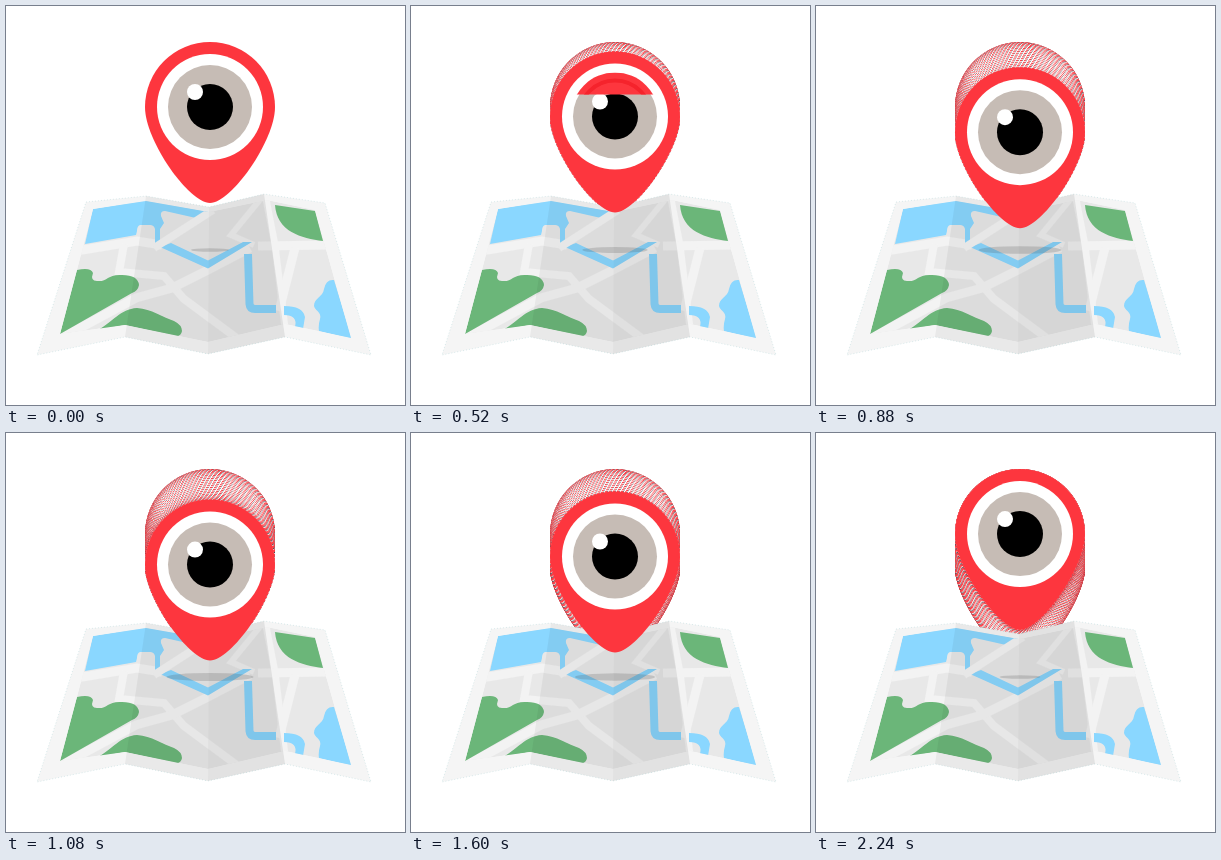
Write an HTML page with a canvas that moves like this. It is 399 px wide and 399 px high and loops after 2280 ms.

```html
<!DOCTYPE html>
<html lang="en">
<head>
<meta charset="utf-8">
<title>Map pin</title>
<style>
html, body { margin: 0; width: 100%; height: 100%; overflow: hidden; background: #fff; }
canvas { display: block; width: 399px; height: 399px; }
</style>
</head>
<body>
<canvas id="stage" width="399" height="399"></canvas>
<script>
const SIZE = 399, LOOP = 2280, STEP = 40, TAU = Math.PI * 2;
const RED = '#fd363e', BLUE = '#8ad7ff', GREEN = '#6bb679';
const ctx = document.getElementById('stage').getContext('2d');

function layer() {
  const c = document.createElement('canvas');
  c.width = c.height = SIZE;
  return c.getContext('2d');
}

const clamp = v => Math.max(0, Math.min(1, v));
const ease = u => (1 - Math.cos(Math.PI * clamp(u))) / 2;
const drop = t => 31.5 * (t < 1210 ? ease((t - 120) / 1080) : 1 - ease((t - 1220) / 1060));
const blink = t => clamp(1 - Math.abs(t - 400) / 160);

function fill(g, path, color) {
  g.fillStyle = color;
  g.fill(new Path2D(path));
}

function line(g, path, color, width) {
  g.strokeStyle = color;
  g.lineWidth = width;
  g.stroke(new Path2D(path));
}

function disc(g, x, y, r, color) {
  g.fillStyle = color;
  g.beginPath();
  g.arc(x, y, r, 0, TAU);
  g.fill();
}

const PIN = new Path2D('M139 101A65 65 0 0 1 269 101C269 135 225 197 204 197C183 197 139 135 139 101Z');
const TRAIL_AREA = new Path2D('M139 101A65 65 0 0 1 269 101V210H139Z');
const SHEET = 'M80 196L140 190L203 201L258 188L319 197L365 349L279 331L202 348L119 331L31 349Z';
const LAND = 'M87 203L140 195L203 206L261 194L309 204L345 332L279 318L202 336L119 319L54 328Z';

function drawMap() {
  const g = layer();
  const road = (path, w) => line(g, path, '#f3f3f3', w);
  fill(g, SHEET, '#f5f5f5');
  g.save();
  g.clip(new Path2D(LAND));
  fill(g, LAND, '#e8e8e8');

  road('M70 245L131 235L156 239', 9);
  road('M118 238L113 266L158 270L178 293L232 333', 8);
  road('M50 335L130 292L166 282L202 264L244 242', 9);
  road('M257 190L225 229L248 239', 6);
  road('M259 188L269 239L279 322', 7);
  road('M252 240L325 239', 9);
  road('M289 242L273 305', 9);

  fill(g, 'M87 203L140 194L205 206L190 212L159 205Q154 205 155 210L158 217L154 223V237H149V223Q148 219 144 219L134 219Q131 220 131 225L130 229L79 238Z', BLUE);
  fill(g, 'M154 241L165 237L202 254.5L237 236H246L202 262.5Z', BLUE);
  road('M148 242L207 204', 8);
  g.lineJoin = 'round';
  line(g, 'M242 248L243.5 298Q244 303 249 303L270 303', BLUE, 8);
  fill(g, 'M278 300Q297 300 299 311L297 323L289 321Q292 309 278 309Z', BLUE);
  fill(g, 'M328 274Q320 273 318 283C317 291 308 292 308 300C309 305 316 306 314 313Q312 320 313 325L346 333Z', BLUE);

  fill(g, 'M269 199L309 205L317 235C295 232 271 226 269 199Z', GREEN);
  fill(g, 'M71 264Q85 261 87 267Q84 275 91 275C102 276 101 268 116 269Q132 269 133 279Q132 285 126 287L54 328Z', GREEN);
  fill(g, 'M92 324C107 316 114 303 131 302C146 303 156 311 168 315Q176 319 176 325Q175 331 169 330L119 319Z', GREEN);
  g.restore();

  fill(g, 'M140 190L203 201L202 348L119 331Z', 'rgba(0,0,0,.05)');
  fill(g, 'M203 201L258 188L279 331L202 348Z', 'rgba(0,0,0,.08)');
  g.setLineDash([1, 2]);
  line(g, SHEET, 'rgba(110,180,185,.35)', 0.7);
  return g.canvas;
}

const map = drawMap();
const trail = layer();

// Each pin position clears its inside and leaves a broken rim behind.
function drawTrail(step) {
  const g = trail;
  g.clearRect(0, 0, SIZE, SIZE);
  g.save();
  g.clip(TRAIL_AREA);
  g.lineWidth = 1;
  for (let i = 1; i <= step; i++) {
    g.save();
    g.translate(0, drop(i * STEP));
    g.globalCompositeOperation = 'destination-out';
    g.fill(PIN);
    g.globalCompositeOperation = 'source-over';
    g.setLineDash([2, 2]);
    g.lineDashOffset = i;
    g.strokeStyle = RED;
    g.stroke(PIN);
    g.setLineDash([1, 3]);
    g.lineDashOffset = i + 2;
    g.strokeStyle = 'rgba(40,40,50,.6)';
    g.stroke(PIN);
    g.restore();
  }
  g.restore();
  ctx.drawImage(g.canvas, 0, 0);
}

function drawShadow(dy) {
  const k = Math.sqrt(dy / 31.5);
  ctx.fillStyle = 'rgba(70,70,70,.2)';
  ctx.beginPath();
  ctx.ellipse(204, 244, 19 + 25 * k, 1.7 + 2.3 * k, 0, 0, TAU);
  ctx.fill();
}

function drawLid(amount) {
  if (amount <= 0) return;
  ctx.save();
  ctx.beginPath();
  ctx.rect(150, 57, 108, 88 * amount);
  ctx.clip();
  disc(ctx, 204, 101, 44, RED);
  ctx.strokeStyle = '#f5232c';
  ctx.lineWidth = 4;
  ctx.beginPath();
  ctx.arc(204, 101, 36, 0, TAU);
  ctx.stroke();
  ctx.restore();
}

function drawPin(t, dy) {
  ctx.save();
  ctx.translate(0, dy);
  ctx.fillStyle = RED;
  ctx.fill(PIN);
  disc(ctx, 204, 101, 53, '#fff');
  disc(ctx, 204, 101, 42, '#c6bcb5');
  disc(ctx, 204, 101, 23, '#000');
  disc(ctx, 189, 86, 8, '#fff');
  drawLid(blink(t));
  ctx.restore();
}

const start = performance.now();

function frame(now) {
  const step = Math.floor((Math.max(0, now - start) % LOOP) / STEP);
  const t = step * STEP, dy = drop(t);
  ctx.fillStyle = '#fff';
  ctx.fillRect(0, 0, SIZE, SIZE);
  drawTrail(step);
  ctx.drawImage(map, 0, 0);
  drawShadow(dy);
  drawPin(t, dy);
  requestAnimationFrame(frame);
}

frame(start);
</script>
</body>
</html>
```
